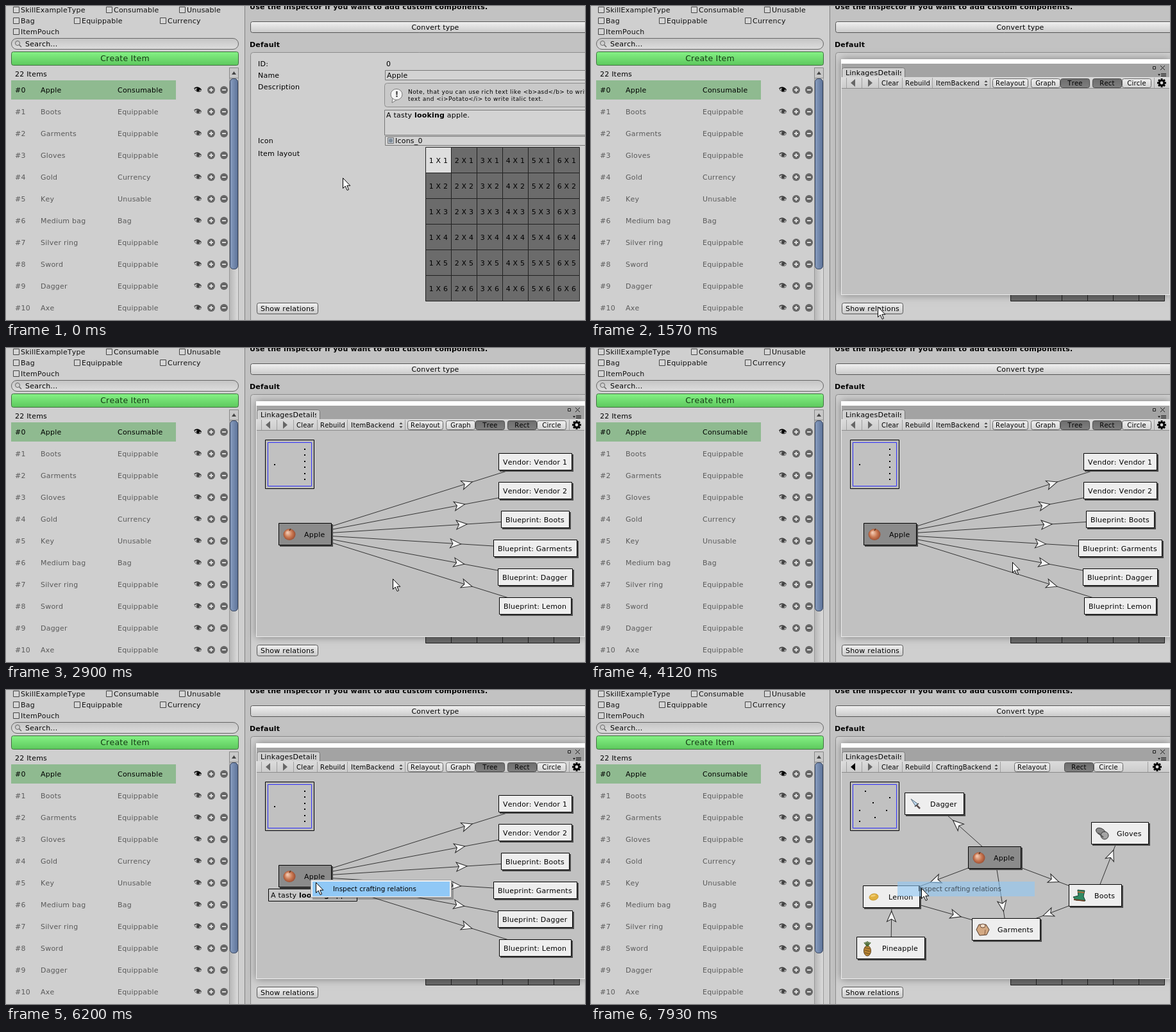
An HTML page with a canvas that plays this animation: 903 by 490 pixels, repeating every 8000 ms.

```html
<!DOCTYPE html>
<html lang="en">
<head>
<meta charset="utf-8">
<title>Item relations</title>
<style>
html, body { margin: 0; width: 100%; height: 100%; overflow: hidden; background: #c2c2c2; }
canvas { display: block; }
</style>
</head>
<body>
<canvas id="stage" width="903" height="490"></canvas>
<script>
const ctx = document.getElementById('stage').getContext('2d');
const LOOP = 8000;

// ---------- drawing helpers ----------
function setFont({ size = 11, bold = false, gap = 0.22 } = {}) {
  ctx.font = `${bold ? 'bold ' : ''}${size}px "DejaVu Sans", sans-serif`;
  ctx.letterSpacing = gap + 'px';
  ctx.fontKerning = 'none';
}

// y is the middle of the capitals
function text(s, x, y, style = {}) {
  setFont(style);
  ctx.textAlign = style.align || 'left';
  ctx.fillStyle = style.color || '#000';
  ctx.fillText(s, x, Math.floor(y + 4));
  return x + ctx.measureText(s).width;
}

function rect(x, y, w, h, fill) {
  ctx.fillStyle = fill;
  ctx.fillRect(x, y, w, h);
}

function box(x, y, w, h, fill, border, radius = 0) {
  ctx.beginPath();
  ctx.roundRect(x + 0.5, y + 0.5, w - 1, h - 1, radius);
  if (fill) { ctx.fillStyle = fill; ctx.fill(); }
  ctx.strokeStyle = border;
  ctx.lineWidth = 1;
  ctx.stroke();
}

function fade(x0, y0, x1, y1, from, to) {
  const g = ctx.createLinearGradient(x0, y0, x1, y1);
  g.addColorStop(0, from);
  g.addColorStop(1, to);
  return g;
}

function button(x, y, w, h, label, from = '#f2f2f2', to = '#c9c9c9', border = '#555', style = {}) {
  box(x, y, w, h, fade(0, y, 0, y + h, from, to), border, 3);
  text(label, x + w / 2, y + h / 2, { align: 'center', ...style });
}

function poly(points, fill, stroke) {
  ctx.beginPath();
  points.forEach(([x, y]) => ctx.lineTo(x, y));
  ctx.closePath();
  if (fill) { ctx.fillStyle = fill; ctx.fill(); }
  if (stroke) { ctx.strokeStyle = stroke; ctx.lineWidth = 1; ctx.stroke(); }
}

function oval(x, y, rx, ry, fill, stroke, turn = 0) {
  ctx.beginPath();
  ctx.ellipse(x, y, rx, ry, turn, 0, 7);
  if (fill) { ctx.fillStyle = fill; ctx.fill(); }
  if (stroke) { ctx.strokeStyle = stroke; ctx.lineWidth = 1; ctx.stroke(); }
}

function line(x0, y0, x1, y1, color, width = 1) {
  ctx.beginPath();
  ctx.moveTo(x0, y0);
  ctx.lineTo(x1, y1);
  ctx.strokeStyle = color;
  ctx.lineWidth = width;
  ctx.stroke();
}

function tastyText(x, y) {
  x = text('A tasty ', x, y);
  x = text('looking', x, y, { bold: true });
  text(' apple.', x, y);
}

// ---------- item list ----------
const items = [
  ['Apple', 'Consumable'], ['Boots', 'Equippable'], ['Garments', 'Equippable'],
  ['Gloves', 'Equippable'], ['Gold', 'Currency'], ['Key', 'Unusable'],
  ['Medium bag', 'Bag'], ['Silver ring', 'Equippable'], ['Sword', 'Equippable'],
  ['Dagger', 'Equippable'], ['Axe', 'Equippable'],
];
const filters = [
  ['SkillExampleType', 11, 1], ['Consumable', 156, 1], ['Unusable', 270, 1],
  ['Bag', 11, 18], ['Equippable', 106, 18], ['Currency', 240, 18], ['ItemPouch', 11, 35],
];

function eye(x, y, color) {
  oval(x + 0.5, y + 0.5, 2.6, 2.6, color);
  ctx.strokeStyle = color;
  ctx.beginPath();
  ctx.moveTo(x - 5.5, y - 1);
  ctx.quadraticCurveTo(x, y - 5.5, x + 5.5, y + 1);
  ctx.lineWidth = 1.6;
  ctx.stroke();
  ctx.beginPath();
  ctx.moveTo(x - 5, y);
  ctx.quadraticCurveTo(x, y + 6.5, x + 5.5, y + 2);
  ctx.lineWidth = 0.9;
  ctx.stroke();
}

function drawList() {
  rect(0, 0, 372, 490, '#cfcfcf');
  for (const [label, x, y] of filters) {
    box(x, y, 10, 10, '#d6d6d6', '#444');
    text(label, x + 12, y + 5, { color: '#111' });
  }
  box(8, 50, 355, 18, fade(0, 50, 0, 68, '#c4c4c4', '#dedede'), '#666', 9);
  oval(18, 58, 3.5, 3.5, null, '#666');
  line(20.5, 60.5, 24, 64, '#666', 1.5);
  text('Search...', 30, 59);
  button(8, 71, 355, 22, 'Create Item', '#86f386', '#5cc75c', '#3f6f3f', { size: 12.5, color: '#143a14' });
  text('22 Items', 14, 106);

  rect(8, 116, 257, 30, '#8fba90');
  items.forEach(([name, type], i) => {
    const y = 131 + 34 * i;
    const color = i ? '#5a5a5a' : '#000';
    text('#' + i, 14, y, { color });
    text(name, 54, y, { color });
    text(type, 174, y, { color });
    eye(299, y - 1, i ? '#444' : '#000');
    for (const x of [320, 340]) {
      oval(x, y, 6, 6, '#666');
      rect(x - 3, y - 1, 6, 2, '#ddd');
    }
    rect(319, y - 3, 2, 6, '#ddd');
  });

  box(348, 96, 15, 400, fade(348, 0, 363, 0, '#b4b4b4', '#dedede'), '#999');
  box(348, 96, 15, 17, '#c8c8c8', '#888');
  poly([[352, 107], [355.5, 102], [359, 107]], '#444');
  box(349, 113, 13, 298, fade(349, 0, 362, 0, '#8ba0c2', '#5b7197'), '#34425c', 5);
}

// ---------- item editor ----------
function drawEditor() {
  rect(372, 0, 531, 490, '#c2c2c2');
  rect(372, 0, 1, 490, '#808080');
  text('Use the inspector if you want to add custom components.', 380, 1, { bold: true });
  button(381, 24, 577, 18, 'Convert type');
  text('Default', 380, 60, { bold: true });
  box(381, 72, 540, 440, '#cfcfcf', '#8c8c8c', 4);

  const labels = [['ID:', 90], ['Name', 108], ['Description', 126], ['Icon', 210], ['Item layout', 230]];
  labels.forEach(([label, y]) => text(label, 393, y));
  text('0', 593, 90);

  box(591, 100, 320, 16, '#d3d3d3', '#777');
  text('Apple', 594, 108);

  box(590, 120, 320, 38, '#c9c9c9', '#8e8e8e', 4);
  poly([[603, 144], [602, 151], [610, 146]], '#f4f4f4', '#777');
  oval(609, 138, 9, 8.5, '#f4f4f4', '#777');
  text('!', 609.5, 138, { bold: true, size: 13, align: 'center', color: '#444' });
  const small = { size: 9, gap: 0.4 };
  text('Note, that you can use rich text like <b>asd</b> to write bold', 627, 133, small);
  text('text and <i>Potato</i> to write italic text.', 627, 144, small);

  box(590, 162, 320, 40, '#d3d3d3', '#777');
  tastyText(593, 170);
  box(591, 203, 320, 15, '#d3d3d3', '#777');
  box(595, 205, 10, 10, '#b9c2cc', '#777');
  oval(600, 210, 3, 3, '#7d8a96');
  text('Icons_0', 607, 210);

  for (let row = 0; row < 6; row++) {
    for (let col = 0; col < 6; col++) {
      const x = 654 + 40 * col, y = 220 + 40 * row;
      box(x, y, 41, 41, row + col ? '#6b6b6b' : '#dedede', '#202020');
      text(`${col + 1} X ${row + 1}`, x + 20.5, y + 21, { align: 'center' });
    }
  }
  button(391, 463, 96, 18, 'Show relations');
}

// ---------- relations window ----------
const tool = { size: 10, gap: 0.2 };

function toggle(x, w, label, on) {
  button(x, 113, w, 15, label, on ? '#6c6c6c' : '#f0f0f0', on ? '#808080' : '#d2d2d2', on ? '#4c4c4c' : '#666', tool);
}

function gear(x, y) {
  for (let i = 0; i < 8; i++) {
    const a = i * Math.PI / 4;
    line(x, y, x + 7 * Math.cos(a), y + 7 * Math.sin(a), '#000', 3);
  }
  oval(x, y, 5.2, 5.2, '#000');
  oval(x, y, 2.4, 2.4, '#d4d4d4');
}

function drawWindow(crafting) {
  ctx.save();
  ctx.shadowColor = 'rgba(0,0,0,.4)';
  ctx.shadowBlur = 12;
  rect(390, 83, 513, 368, '#eee');
  ctx.restore();
  rect(390, 83, 513, 7, '#fff');
  rect(391, 90, 511, 21, '#a3a3a3');
  box(391, 96, 99, 20, '#d0d0d0', '#777', 3);
  ctx.save();
  ctx.beginPath();
  ctx.rect(391, 96, 93, 15);
  ctx.clip();
  text('LinkagesDetails', 397, 104);
  ctx.restore();
  box(876, 94, 5, 5, null, '#222');
  line(888, 93, 895, 100, '#222');
  line(895, 93, 888, 100, '#222');
  poly([[884, 106], [888, 106], [886, 109]], '#222');
  for (let y = 105; y < 110; y += 2) rect(889, y, 8, 1, '#222');

  rect(391, 111, 511, 18, fade(0, 111, 0, 129, '#dcdcdc', '#cbcbcb'));
  rect(391, 128, 511, 1, '#8c8c8c');
  const end = crafting ? 638 : 622;
  for (const x of [398, 422, 448, 485, 532, end]) rect(x, 112, 1, 16, '#a0a0a0');
  poly([[405, 120], [412, 114], [412, 126]], crafting ? '#000' : '#666');
  poly([[439, 120], [432, 114], [432, 126]], '#666');
  text('Clear', 453, 120, tool);
  text('Rebuild', 490, 120, tool);
  text(crafting ? 'CraftingBackend' : 'ItemBackend', 538, 120, tool);
  const s = end - 6;
  poly([[s - 2.5, 119], [s, 116], [s + 2.5, 119]], '#444');
  poly([[s - 2.5, 122], [s, 125], [s + 2.5, 122]], '#444');
  toggle(crafting ? 660 : 626, 56, 'Relayout');
  if (!crafting) {
    toggle(686, 46, 'Graph');
    toggle(732, 46, 'Tree', true);
  }
  const shape = crafting ? 738 : 782;
  toggle(shape, 46, 'Rect', true);
  toggle(shape + 46, 46, 'Circle');
  rect(crafting ? 868 : 878, 112, 1, 16, '#a0a0a0');
  gear(crafting ? 883 : 890, 120);
  rect(391, 129, 511, 321, '#c1c1c1');
}

// ---------- graph ----------
const icons = {
  Apple(x, y) {
    const g = ctx.createRadialGradient(x - 3, y - 3, 1, x, y, 10);
    g.addColorStop(0, '#f0c6ae');
    g.addColorStop(0.55, '#c87650');
    g.addColorStop(1, '#954a30');
    oval(x, y, 9.5, 9, g);
    line(x, y - 6, x + 2, y - 9, '#5d3a22', 1.5);
  },
  Dagger(x, y) {
    poly([[x - 7, y - 8], [x + 4, y], [x, y + 3]], '#bcd6ec', '#5a6b7a');
    line(x - 1, y + 4, x + 5, y - 1, '#444', 1.5);
    line(x + 2, y + 2, x + 7, y + 7, '#5a4d4d', 2.5);
  },
  Gloves(x, y) {
    oval(x - 2, y - 3, 8, 5, '#8a8a8a', '#333', 0.5);
    oval(x + 4, y + 3, 6, 6, '#a5a5a5', '#333');
    line(x - 6, y - 1, x + 2, y + 6, '#555', 2);
  },
  Lemon(x, y) {
    oval(x, y, 7, 5, '#e0b040', '#c79a34', -0.2);
    oval(x - 1, y - 2, 4, 1.5, '#f0cd73', null, -0.2);
  },
  Boots(x, y) {
    poly([[x - 3, y - 9], [x + 8, y - 8], [x + 6, y + 1], [x + 9, y + 8], [x - 6, y + 7], [x - 10, y + 2], [x - 2, y]], '#2f8a63', '#153f30');
    line(x - 3, y - 6, x + 7, y - 5, '#b06a3a', 2);
    line(x - 9, y + 6, x + 8, y + 8, '#6b3f24', 2);
  },
  Garments(x, y) {
    poly([[x - 6, y - 8], [x + 5, y - 8], [x + 10, y], [x + 6, y + 8], [x - 5, y + 9], [x - 10, y]], '#d3a983', '#4f3626');
    oval(x, y - 6, 4, 3, '#f0dcc8', '#6b4a35');
    line(x + 4, y, x + 3, y + 8, '#8b5f42');
  },
  Pineapple(x, y) {
    oval(x, y + 4, 5.5, 8, '#b98534', '#5d421d');
    for (let i = -1; i < 2; i++) line(x - 4, y + 3 + i * 4, x + 4, y + 5 + i * 4, '#6b4c1f');
    for (let i = -2; i < 3; i++) line(x, y - 3, x + i * 2.5, y - 11 + Math.abs(i), '#4c6a34', 1.6);
  },
};

// [label, x, y, shift x, shift y]: shift is the offset one step before the tree settles
const treeNodes = [
  ['Apple', 467, 291, 0, 3],
  ['Vendor: Vendor 1', 825.5, 178, -14, 0], ['Vendor: Vendor 2', 825.5, 223, -94, 3],
  ['Blueprint: Boots', 825.5, 268, -36, -1], ['Blueprint: Garments', 825.5, 313, 0, -4],
  ['Blueprint: Dagger', 825.5, 358, -19, 13], ['Blueprint: Lemon', 825.5, 403, -83, 0],
];
const treeEdges = [[0, 1], [0, 2], [0, 3], [0, 4], [0, 5], [0, 6]];
const craftNodes = [
  ['Apple', 630, 262], ['Dagger', 536, 178], ['Gloves', 825, 224], ['Lemon', 469, 323],
  ['Boots', 787, 321], ['Garments', 648, 374], ['Pineapple', 468, 403],
];
const craftEdges = [[0, 1], [0, 3], [0, 5], [0, 4], [4, 5], [4, 2], [3, 5], [6, 3]];

function place([label, x, y, dx = 0, dy = 0], unsettled) {
  const icon = icons[label];
  setFont();
  const w = Math.round(ctx.measureText(label).width) + (icon ? 51 : 15);
  return { label, icon, x: x + dx * unsettled, y: y + dy * unsettled, w, h: icon ? 35 : 27 };
}

function drawEdge(a, b) {
  const dx = b.x - a.x, dy = b.y - a.y;
  line(a.x, a.y, b.x, b.y, '#333');
  const reach = 1 - Math.min(b.w / 2 / Math.abs(dx || 1e-6), b.h / 2 / Math.abs(dy || 1e-6));
  ctx.save();
  ctx.translate(a.x + dx * reach * 0.8, a.y + dy * reach * 0.8);
  ctx.rotate(Math.atan2(dy, dx));
  poly([[8, 0], [-8.5, -7], [-4.5, 0], [-8.5, 7]], '#f4f4f4', '#222');
  ctx.restore();
}

function drawNode({ label, icon, x, y, w, h }) {
  const left = Math.floor(x - w / 2), top = Math.floor(y - h / 2);
  const focus = label === 'Apple';
  rect(left + 2, top + 2, w, h, '#4a4a4a');
  box(left, top, w, h, focus ? '#8b8b8b' : '#eeeeee', '#000');
  if (icon) icon(left + 17, top + 18);
  text(label, left + (icon ? 40 : 7), top + h / 2 + 0.5);
}

function drawGraph(nodeList, edges, unsettled = 0) {
  const nodes = nodeList.map(n => place(n, unsettled));
  edges.forEach(([a, b]) => drawEdge(nodes[a], nodes[b]));
  nodes.forEach(drawNode);
  box(404, 143, 77, 77, '#b9b9b9', '#000');
  box(408, 147, 69, 69, '#c1c1c1', '#3232ff');
  for (const { x, y } of nodes) {
    rect(Math.round(418 + (x - 467) * 0.131), Math.round(157 + (y - 178) * 0.209), 2, 2, '#000');
  }
}

function drawMenu(closing, hover) {
  ctx.save();
  if (closing) {
    ctx.globalAlpha = 0.6;
  } else {
    rect(478, 299, 220, 28, 'rgba(0,0,0,.25)');
    box(475, 296, 220, 28, '#f0f0f0', '#a0a0a0');
  }
  if (hover) rect(478, 299, 214, 23, '#90c8f6');
  text('Inspect crafting relations', 510, 310, { size: 10.4, gap: 0 });
  ctx.restore();
}

// ---------- pointer ----------
// [time, x, y] of the arrow tip
const path = [
  [0, 525, 268], [370, 525, 268], [1210, 451, 464], [1330, 447, 469], [2180, 447, 469],
  [2900, 603, 360], [3020, 626, 361], [3630, 750, 388], [3880, 750, 388], [4120, 656, 334],
  [4360, 737, 355], [4610, 737, 355], [5220, 494, 320], [5460, 475, 298], [6080, 475, 298],
  [6570, 509, 308], [6690, 515, 309], [LOOP, 515, 309],
];
const clicks = [[1330, 1570], [5840, 6080], [7560, 7930]];

function snap(t) {
  let now = 0;
  for (let k = 0, next = 485; next <= t; k++, next = 485 + 120 * k + 0.0323 * k * k) now = next + 4;
  return now;
}

function pointerAt(t) {
  const i = path.findIndex(p => p[0] > t);
  const [t0, x0, y0] = path[i - 1], [t1, x1, y1] = path[i];
  const f = (t - t0) / (t1 - t0);
  return [Math.round(x0 + (x1 - x0) * f), Math.round(y0 + (y1 - y0) * f)];
}

function drawPointer(x, y, clicking) {
  if (clicking) oval(x + 1.5, y + 2.5, 10, 10, 'rgba(255,255,255,.4)', '#111');
  const shape = [[0, 0], [0, 16], [3.7, 12.6], [6.6, 19], [9, 18], [6.3, 11.8], [11.3, 11.8]];
  poly(shape.map(([dx, dy]) => [x + 0.5 + dx, y + 0.5 + dy]), '#fff', '#000');
}

// ---------- timeline ----------
function draw(t) {
  const [x, y] = pointerAt(snap(t));
  const crafting = t >= 7930;
  drawList();
  drawEditor();
  if (t >= 1570) drawWindow(crafting);
  if (crafting) {
    drawGraph(craftNodes, craftEdges);
  } else if (t >= 1690) {
    drawGraph(treeNodes, treeEdges, t < 1810 ? 1.8 : t < 1930 ? 1 : 0);
  }
  if (t >= 5460 && !crafting) {
    box(409, 310, 139, 20, '#c9c9c9', '#000');
    tastyText(413, 320);
  }
  if (t >= 6080) drawMenu(crafting, x > 477);
  drawPointer(x, y, clicks.some(([from, to]) => t >= from && t < to));
}

function tick() {
  draw(performance.now() % LOOP);
  requestAnimationFrame(tick);
}
tick();
</script>
</body>
</html>
```
